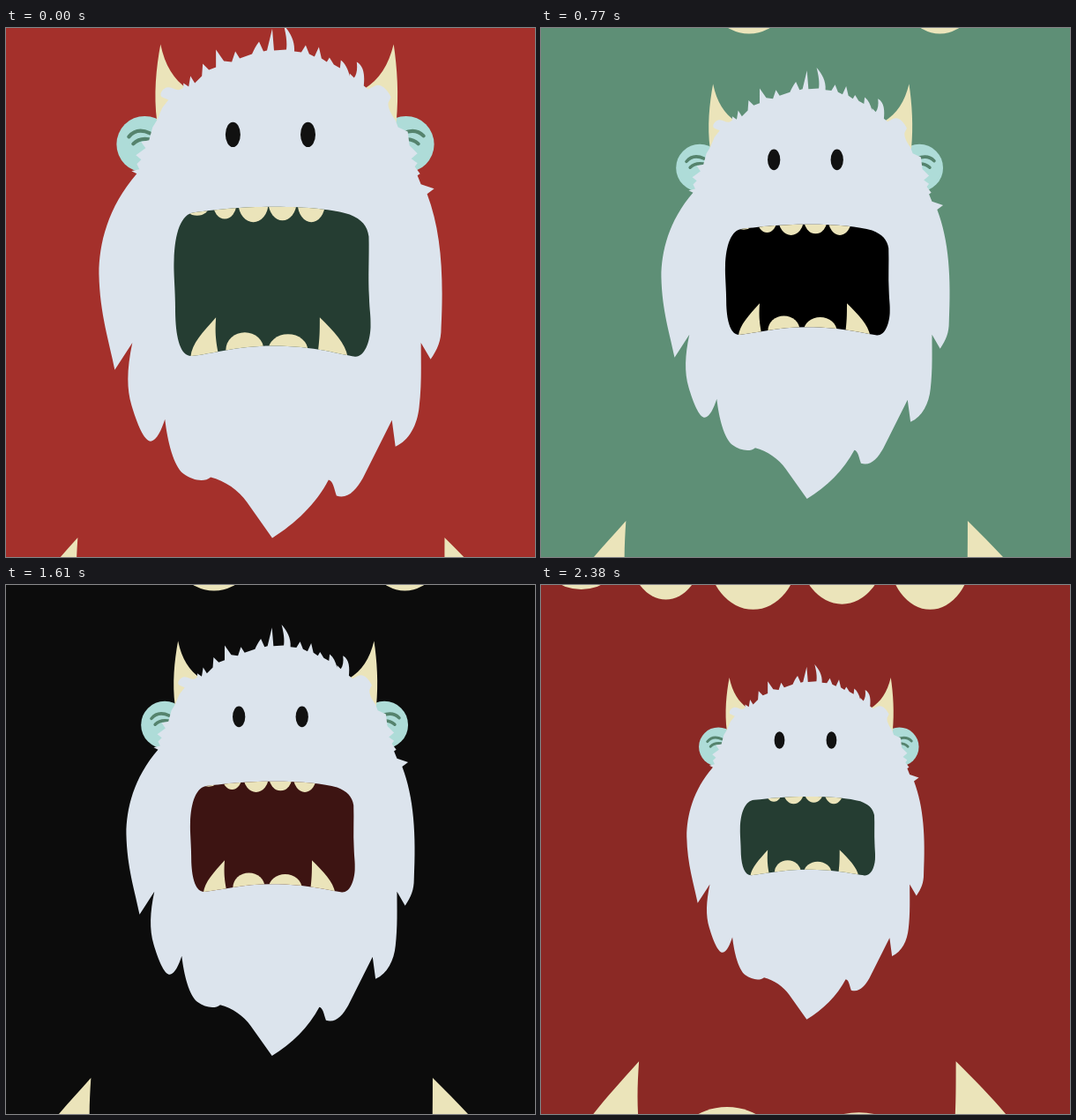
Write an HTML page with a canvas that moves like this. It is 600 px wide and 600 px high and loops after 2450 ms.

```html
<!DOCTYPE html>
<html lang="en">
<head>
<meta charset="utf-8">
<title>Endless yeti</title>
<style>
  html, body { margin: 0; width: 100%; height: 100%; overflow: hidden; background: #a42f29; }
  canvas { display: block; width: 100vw; height: 100vh; }
</style>
</head>
<body>
<canvas id="stage" width="600" height="600"></canvas>
<script>
const ctx = document.getElementById('stage').getContext('2d');
const STEP = 70, STEPS = 35, SPACING = 12;
const FUR = '#dce4ed', BONE = '#ebe4ba', EAR = '#aedcd8', EAR_LINE = '#55836d', EYE = '#111';

// Mouth colours: dark inside, bright once it has become the backdrop
const MOUTHS = [
  [[37, 61, 50], [135, 202, 167]],
  [[0, 0, 0], [20, 20, 20]],
  [[61, 20, 18], [216, 62, 56]]
];

// Jaw opening per step, from step -8 on
const JAW = [-.1, -.05, 0, .055, .165, .28, .39, .5, .61, .695, .77, .83,
  .885, .93, .965, .99, 1, 1.01, 1.015];

const head = new Path2D(`M148 165
  C115 203 105 245 105 279 C106 325 117 357 123 388 L143 357
  C137 385 136 408 142 428 C148 448 156 469 164 469 C171 468 176 456 180 444
  C183 470 190 497 201 506 C212 514 225 516 232 510
  C248 514 264 525 273 538 L302 579
  C328 563 352 540 366 513 C371 514 372 522 375 531
  C388 535 397 525 405 511 L438 445 L442 475
  C458 468 467 450 469 430 C472 405 471 380 471 357 L482 376
  C490 364 494 355 494 340 C497 280 494 230 478 188
  L486 182 L471 177 L467 167 L470 165 L464 157 L467 153 L460 148 L467 142 L458 133 L456 117
  L445 112 L442 104 C436 96 433 88 434 84 L437 78 C433 70 426 62 419 65 L411 69 L406 65
  C407 55 407 43 398 38 C399 46 398 52 395 56 L390 51 L390 54
  C388 46 385 40 380 36 L379 45 L372 41 L367 33 L364 38 L358 34 L355 21 L350 32
  L344 29 L340 19 L335 27 L327 26 C328 14 322 4 315 -4 C318 8 319 16 318 24
  L304 25 L302 0 L296 25 L292 26 L287 15 C283 20 281 25 279 29
  L265 34 L260 26 L256 38 L247 37 L238 24 L238 44 L230 47 L223 40 L222 54
  L214 62 L209 54 L207 66 L201 62 L201 67 C194 74 189 65 182 67
  C176 69 173 76 177 78 L184 81 L177 90 L171 104
  L166 112 L162 127 L153 129 L158 136 L147 144 L153 149 L148 154 L151 160 L142 162 Z`);
const horns = new Path2D(`M171 106 C167 75 170 45 175 18 C180 42 190 58 206 69 L200 106 Z
  M443 106 C446 75 444 45 440 18 C434 42 424 58 406 69 L412 106 Z`);
const earLines = new Path2D(`M139 123 Q148 112 163 119 M144 131 Q151 124 162 126
  M474 122 Q465 113 451 119 M468 131 Q462 125 452 126`);
const fangs = new Path2D(`M-62 77 C-63 92 -63 103 -58 124 L-58 150 L-91 150 L-91 125
  C-91 108 -78 95 -62 77 Z
  M56 77 C56 95 56 102 53 124 L53 150 L88 150 L88 125 C87 108 73 94 56 77 Z`);

// Centre x, bottom y, radii
const upperTeeth = [
  [-83.5, -96.5, 14.4, 12], [-52, -92.7, 13.3, 17.3], [-19.5, -89, 16.9, 21],
  [13.6, -91, 15.9, 20], [46.4, -89, 15.5, 21], [79.6, -101, 15, 12]
];
const lowerTeeth = [[-29.2, 134, 21.6, 20], [19.9, 134, 22.6, 19]];

// Start point followed by cubic segments
const SHUT = [-80, -64, -55, -67, -36, -68.5, 4, -68.5, 45, -68.5, 72, -67, 90, -62,
  104, -58, 111, -52, 115, -44, 116, -41, 116, -38, 116, -34, 116, -30, 116, -28, 115, -25,
  113, -15, 107, -10, 98, -11, 80, -13, 50, -16, 2, -16, -38, -16, -67, -13, -88, -11,
  -96, -12, -100, -18, -102, -25, -103, -28, -103, -30, -103, -34, -102, -48, -95, -62, -80, -64];
const OPEN = [-91, -108.3, -63.5, -111.3, -36, -115.8, 4, -115.8, 42, -115.8, 72, -111.3, 90, -105.8,
  103.6, -99, 109.6, -91, 109.6, -76, 110, -42, 107.4, -4, 109.6, 30, 110.4, 55, 113, 59, 113, 81,
  113, 104, 106, 127, 95, 126.5, 80, 124, 51, 109.5, 2, 109.5, -38, 109.5, -68, 123, -91, 125.3,
  -106, 126.5, -112, 98, -112, 60, -111, 13, -115, -13, -114, -38, -113.4, -80, -106, -107.4, -91, -108.3];

const mix = (a, b, t) => a + (b - a) * t;
const clamp = (v, lo, hi) => Math.min(hi, Math.max(lo, v));

function zoom(n) {
  const m = n + 11;
  return (m * m - .4) * (.01004 - .0001734 * m + 1.17e-6 * m * m);
}

function mouthColor(id, n) {
  const [dark, bright] = MOUTHS[id];
  const t = clamp((n - 4) / 12, 0, 1);
  return `rgb(${dark.map((c, i) => Math.round(mix(c, bright[i], t)))})`;
}

function mouthPath(q) {
  const p = SHUT.map((v, i) => mix(v, OPEN[i], q));
  const path = new Path2D();
  path.moveTo(p[0], p[1]);
  for (let i = 2; i < p.length; i += 6) path.bezierCurveTo(...p.slice(i, i + 6));
  path.closePath();
  return path;
}

function ellipse(x, y, rx, ry, color) {
  ctx.fillStyle = color;
  ctx.beginPath();
  ctx.ellipse(x, y, rx, ry, 0, 0, Math.PI * 2);
  ctx.fill();
}

function drawMouth(q, color) {
  const path = mouthPath(q);
  ctx.fillStyle = color;
  ctx.fill(path);
  ctx.clip(path);
  const upper = 23 * (1 - q), lower = -125 * (1 - q);
  for (const [x, y, rx, ry] of upperTeeth) ellipse(x, y - ry + upper, rx, ry, BONE);
  for (const [x, y, rx, ry] of lowerTeeth) ellipse(x, y - ry + lower, rx, ry, BONE);
  ctx.translate(0, lower);
  ctx.fill(fangs);
}

function drawYeti(id, n) {
  const k = zoom(n);
  ctx.save();
  ctx.translate(300, 300);
  ctx.scale(k, k);
  ctx.translate(-300, -300);
  ellipse(157, 131.5, 32, 32, EAR);
  ellipse(454, 131.5, 32, 32, EAR);
  ctx.strokeStyle = EAR_LINE;
  ctx.lineWidth = 4.2;
  ctx.lineCap = 'round';
  ctx.stroke(earLines);
  ctx.fillStyle = BONE;
  ctx.fill(horns);
  ctx.fillStyle = FUR;
  ctx.fill(head);
  ellipse(257.3, 120.5, 8.5, 14.2, EYE);
  ellipse(342.6, 120.5, 8.5, 14.2, EYE);
  ctx.translate(300, 300);
  drawMouth(JAW[clamp(n + 8, 0, JAW.length - 1)], mouthColor(id, n));
  ctx.restore();
}

function draw(step) {
  for (let i = -2; i <= 3; i++) {
    const n = step - i * SPACING;
    const id = (i + 3) % 3;
    if (n < -10 || n > 25) continue;
    if (n > 13) {
      ctx.fillStyle = mouthColor(id, n);
      ctx.fillRect(0, 0, 600, 600);
    } else {
      drawYeti(id, n);
    }
  }
}

const start = performance.now();
function tick() {
  draw(Math.floor((performance.now() - start) / STEP) % STEPS);
  requestAnimationFrame(tick);
}
tick();
</script>
</body>
</html>
```
